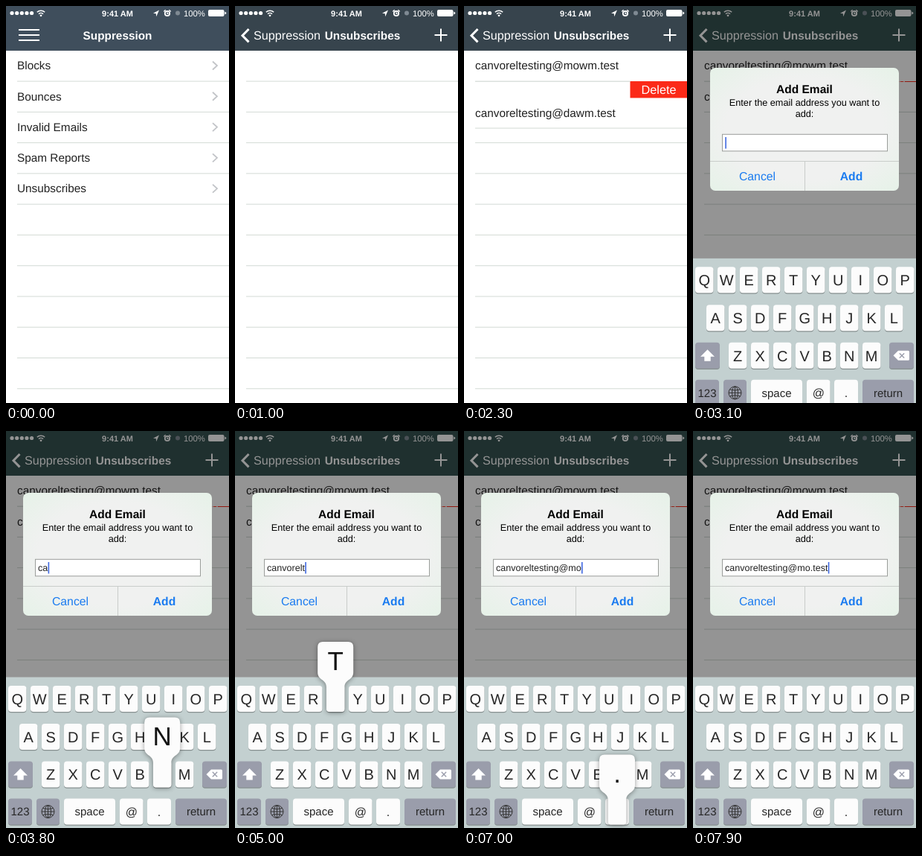
These frames come from a looping animation (300 by 533 pixels, 8000 ms). An HTML page:

```html
<!DOCTYPE html>
<html lang="en">
<head>
<meta charset="utf-8">
<title>Suppression list</title>
<style>
html, body { margin: 0; height: 100%; overflow: hidden; background: #fff; }
svg { display: block; width: 100%; height: 100%; }
text { font-family: "Liberation Sans", Arial, sans-serif; font-size: 15.35px; text-rendering: geometricPrecision; }
.b { font-weight: bold; }
.mid { text-anchor: middle; }
.row { fill: #222; }
.sep { stroke: #d3dad5; fill: none; }
.white { fill: #fff; }
.line { fill: none; stroke: #fff; }
#popShape { filter: drop-shadow(0 1px 3px rgba(0,0,0,.4)); }

.anim { animation: 8s infinite both; }
#bar { animation-name: bar; }
#old { animation-name: old; }
#page { animation-name: page; }
#oldTitle { animation-name: oldTitle; }
#backLabel { animation-name: backLabel; }
#newTitle { animation-name: newTitle; }
.fadeOut { animation-name: fadeOut; }
.fadeIn { animation-name: fadeIn; }
#tap { animation-name: tap; }
#rows { animation-name: rows; }
#row2 { animation-name: squash; }
#slide { animation-name: slide; }
#row3 { animation-name: lift; }
#dim { animation-name: dim; }
#alert { animation-name: alert; transform-origin: 150px 165px; }
#board { animation-name: board; }

/* push to the next screen: 560 - 1000 ms */
@keyframes bar {
  0%, 7% { fill: #3f4e5c; }
  12%, 34.5% { fill: #37444d; }
  38%, 100% { fill: #365251; }
}
@keyframes old {
  0%, 7% { transform: none; animation-timing-function: cubic-bezier(.2,.8,.2,1); }
  12.4% { transform: translateX(-90px); visibility: visible; }
  12.5%, 100% { transform: translateX(-90px); visibility: hidden; }
}
@keyframes page {
  0%, 7% { transform: translateX(300px); animation-timing-function: cubic-bezier(.2,.8,.2,1); }
  12.4%, 100% { transform: none; }
}
@keyframes oldTitle {
  0%, 7% { transform: none; opacity: 1; animation-timing-function: ease-out; }
  11%, 100% { transform: translateX(-80px); opacity: 0; }
}
@keyframes backLabel {
  0%, 7% { transform: translateX(80px); opacity: 0; animation-timing-function: ease-out; }
  12%, 100% { transform: none; opacity: 1; }
}
@keyframes newTitle {
  0%, 7% { transform: translateX(110px); opacity: 0; animation-timing-function: ease-out; }
  12%, 100% { transform: none; opacity: 1; }
}
@keyframes fadeOut { 0%, 7% { opacity: 1; } 10%, 100% { opacity: 0; } }
@keyframes fadeIn { 0%, 8% { opacity: 0; } 12%, 100% { opacity: 1; } }
@keyframes tap { 0%, 6.8% { opacity: 0; } 6.81%, 100% { opacity: 1; } }

/* addresses load, then the second one is swiped and deleted */
@keyframes rows { 0%, 14.9% { visibility: hidden; } 14.91%, 100% { visibility: visible; } }
@keyframes slide {
  0%, 18.1% { transform: none; animation-timing-function: ease-out; }
  22.5%, 27.5% { transform: translateX(-76.5px); }
  28.6%, 100% { transform: translateX(-300px); }
}
@keyframes squash {
  0%, 27.5% { transform: none; animation-timing-function: ease; }
  32%, 100% { transform: translateY(-20.6px); }
}
@keyframes lift {
  0%, 27.5% { transform: none; animation-timing-function: ease; }
  32%, 100% { transform: translateY(-41.27px); }
}

/* dialog and keyboard */
@keyframes dim { 0%, 34.5% { opacity: 0; } 38%, 100% { opacity: 1; } }
@keyframes alert {
  0%, 34.5% { opacity: 0; transform: scale(1.2); animation-timing-function: ease-out; }
  38.5%, 100% { opacity: 1; transform: none; }
}
@keyframes board {
  0%, 35.5% { transform: translateY(206px); animation-timing-function: cubic-bezier(.2,.7,.2,1); }
  41%, 100% { transform: none; }
}
</style>
</head>
<body>
<svg viewBox="0 0 300 533" preserveAspectRatio="none">
  <defs>
    <radialGradient id="glass" r=".7">
      <stop offset=".6" stop-color="#f0f1f0"/>
      <stop offset="1" stop-color="#e6f2e8"/>
    </radialGradient>
  </defs>
  <rect width="300" height="533" fill="#fff"/>

  <g id="old" class="anim">
    <rect id="tap" class="anim" y="225" width="300" height="41" fill="#d9d9d9"/>
    <g id="menu"></g>
  </g>

  <g id="page" class="anim">
    <rect y="60" width="300" height="473" fill="#fff"/>
    <path class="sep grid"/>
    <g id="rows" class="anim">
      <g id="row2" class="anim">
        <rect x="223.5" y="101" width="76.5" height="42" fill="#fb2a18"/>
        <text class="mid white" x="262" y="128" style="font-size:16.3px">Delete</text>
        <g id="slide" class="anim">
          <rect y="101" width="300" height="42" fill="#fff"/>
          <text class="row" x="15" y="126.5">canvoreltesting@mo.test</text>
          <path class="sep" d="M15 142.34h285"/>
        </g>
      </g>
      <g id="row3" class="anim">
        <rect y="143" width="300" height="40" fill="#fff"/>
        <text class="row" x="15" y="168.3">canvoreltesting@dawm.test</text>
        <path class="sep" d="M15 183.6h285"/>
      </g>
      <rect y="60" width="300" height="41" fill="#fff"/>
      <text class="row" x="15" y="85">canvoreltesting@mowm.test</text>
      <path class="sep" d="M15 101.07h208.5"/>
    </g>
  </g>

  <rect id="bar" class="anim" width="300" height="60"/>
  <g class="white">
    <path class="anim fadeOut line" stroke-width="2" d="M17 32h28M17 39h28M17 46h28"/>
    <text id="oldTitle" class="anim b mid" x="150" y="45">Suppression</text>
    <path class="anim fadeIn line" stroke-width="3" d="M18.5 31l-8.5 8.7 8.5 8.7"/>
    <text id="backLabel" class="anim" x="25" y="45" style="font-size:16.2px">Suppression</text>
    <text id="newTitle" class="anim b mid" x="171.5" y="45">Unsubscribes</text>
    <path class="anim fadeIn line" stroke-width="2" d="M268.5 39h17M277 30.5v17"/>

    <g id="signal"></g>
    <path class="line" stroke-width="1.5" d="M41.8 8.3a7.4 7.4 0 0 1 10.4 0M44 10.7a4.3 4.3 0 0 1 6 0"/>
    <circle cx="47" cy="12.8" r="1.4"/>
    <text class="b mid" x="150" y="13.5" style="font-size:11px">9:41 AM</text>
    <path d="M206 5.5l-8 4.2 3.8.5.4 4z"/>
    <circle class="line" cx="217" cy="10" r="3.2" stroke-width="1.8"/>
    <path class="line" stroke-width="1.3" d="M212.3 7.5l2.3-2.3M221.7 7.5l-2.3-2.3M217 8.3v2h1.6"/>
    <circle cx="231" cy="9.5" r="3" fill="#7f8a93"/>
    <text x="239" y="13.7" style="font-size:11.3px">100%</text>
    <rect x="272" y="5" width="21.5" height="9" rx="2"/>
    <path d="M294.3 7.7q2 .3 2 1.8t-2 1.8z"/>
  </g>

  <rect id="dim" class="anim" width="300" height="533" fill="#000" fill-opacity=".42"/>

  <g id="alert" class="anim">
    <rect x="23" y="83" width="254" height="165" rx="7" fill="url(#glass)"/>
    <text class="b mid" x="150" y="117" style="font-size:15.5px">Add Email</text>
    <g class="mid">
      <text x="150" y="134.3" style="font-size:12.7px">Enter the email address you want to</text>
      <text x="150" y="149.3" style="font-size:12.7px">add:</text>
    </g>
    <rect x="39.5" y="172.3" width="222" height="22.5" fill="#fff" stroke="#9a9d9a"/>
    <text id="field" x="43" y="188" fill="#222" style="font-size:12.57px"></text>
    <rect id="caret" y="176" width="1.6" height="15.5" fill="#3f68e0"/>
    <path d="M23 208.5h254M150.5 208.5v39.5" stroke="#c9cdca"/>
    <g class="mid" fill="#1a7bf0">
      <text x="86.5" y="233.5" style="font-size:15.8px">Cancel</text>
      <text class="b" x="213" y="233.5" style="font-size:15.7px">Add</text>
    </g>
  </g>

  <g id="board" class="anim">
    <rect y="330.5" width="300" height="203" fill="#c3d0d0"/>
    <g id="keys"></g>
    <path class="white" d="M19.5 453l-9.5 9.5h5.3v6h8.4v-6h5.3z"/>
    <path class="white" d="M276 454.5h13.5q1.5 0 1.5 1.5v10q0 1.5-1.5 1.5H276l-6.5-6.5z"/>
    <path d="M277.8 457.8l6.4 6.4M284.2 457.8l-6.4 6.4" stroke="#9a9dab" stroke-width="1.4"/>
    <g fill="none" stroke="#333" stroke-width="1">
      <circle cx="56.5" cy="511" r="8.5"/>
      <ellipse cx="56.5" cy="511" rx="4" ry="8.5"/>
      <path d="M56.5 502.5v17M48 511h17M49.5 506.5q7 2.5 14 0M49.5 515.5q7-2.5 14 0"/>
    </g>
    <g id="pop">
      <path id="popShape" fill="#fcfcfc" d="M-17-59H17Q24-59 24-52V-18C24-7 12.2-9 12.2 2V31Q12.2 35 8.2 35H-8.2Q-12.2 35-12.2 31V2C-12.2-9-24-7-24-18V-52Q-24-59-17-59Z"/>
      <text id="popText" class="mid" y="-21.5" style="font-size:35px" fill="#111"></text>
    </g>
  </g>
</svg>

<script>
const $ = id => document.getElementById(id);
const LOOP = 8000;
const entry = "canvoreltesting@mo.test";

// static lists
const edge = k => 59.8 + 41.27 * k;
const grid = Array.from({ length: 11 }, (_, k) => `M15 ${edge(k + 1)}h285`).join("");
document.querySelector(".grid").setAttribute("d", grid);

const items = ["Blocks", "Bounces", "Invalid Emails", "Spam Reports", "Unsubscribes"];
$("menu").innerHTML = `<path class="sep" d="${grid}"/>` + items.map((name, k) => {
  const y = 80 + 41.27 * k;
  return `<text class="row" x="15" y="${y + 5.3}">${name}</text>
    <path d="M278 ${y - 5.5}l6 5.5-6 5.5" fill="none" stroke="#c2c4c8" stroke-width="1.8"/>`;
}).join("");

$("signal").innerHTML = [0, 1, 2, 3, 4]
  .map(i => `<circle cx="${8 + 6.65 * i}" cy="9.5" r="2.6"/>`).join("");

// keyboard
const spots = {};
let keys = "";

function addKey(x, y, w, label, size, dark) {
  keys += `<rect x="${x}" y="${y + 1.2}" width="${w}" height="35" rx="4" fill="#879090"/>
    <rect x="${x}" y="${y}" width="${w}" height="35" rx="4" fill="${dark ? "#9a9dab" : "#fcfcfc"}"/>
    <text class="mid" x="${x + w / 2}" y="${y + 17.5 + size * 0.36}" fill="#262626" style="font-size:${size}px">${label}</text>`;
  spots[label.toLowerCase()] = { x: x + w / 2, y };
}

[["QWERTYUIOP", 3, 342], ["ASDFGHJKL", 18, 393], ["ZXCVBNM", 48, 443.5]].forEach(([letters, x, y]) =>
  [...letters].forEach((c, i) => addKey(x + 30 * i, y, 24.4, c, 20)));
addKey(3, 443.5, 33, "", 15, true);
addKey(264, 443.5, 33, "", 15, true);
addKey(3, 493.5, 32, "123", 15, true);
addKey(41, 493.5, 31, "", 15, true);
addKey(78, 493.5, 69, "space", 15);
addKey(153, 493.5, 31.5, "@", 16);
addKey(190, 493.5, 32, ".", 16);
addKey(228, 493.5, 69, "return", 15, true);
$("keys").innerHTML = keys;

// typing: moment the n-th key goes down
const press = n =>
  n < 9 ? 3780 + (n - 3) * 187 :
  n < 14 ? 4902 + (n - 9) * 222 :
  6010 + (n - 14) * 188;
const INSERT = 70, HOLD = 150;

function type(t) {
  let count = 0, held = "";
  [...entry].forEach((c, i) => {
    const dt = t - press(i + 1);
    if (dt >= INSERT) count = i + 1;
    if (dt >= 0 && dt < HOLD) held = c;
  });
  $("field").textContent = entry.slice(0, count);
  $("caret").setAttribute("x", 43.3 + (count ? $("field").getComputedTextLength() : 0));
  $("pop").style.display = held ? "" : "none";
  if (held) {
    const { x, y } = spots[held];
    $("pop").setAttribute("transform", `translate(${x} ${y})`);
    $("popText").textContent = held.toUpperCase();
  }
}

let start;
function tick(now) {
  start ??= now;
  type((now - start) % LOOP);
  requestAnimationFrame(tick);
}
type(0);
requestAnimationFrame(tick);
</script>
</body>
</html>
```
